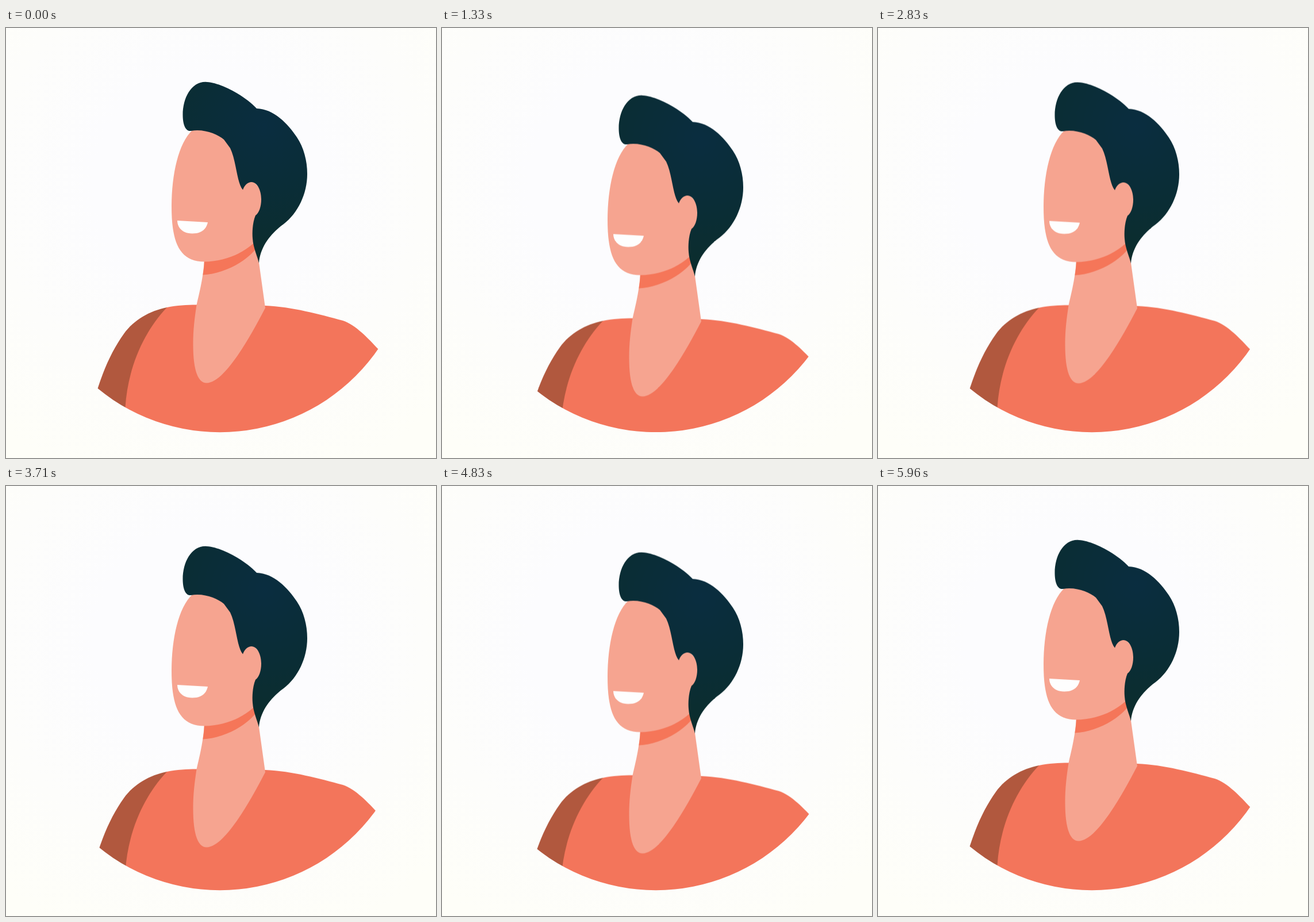
These frames come from a looping animation (748 by 748 pixels, 6000 ms). An HTML page:

```html
<!DOCTYPE html>
<html lang="en">
<head>
<meta charset="utf-8">
<title>Breathing portrait</title>
<style>
  html, body { margin: 0; width: 100%; height: 100%; overflow: hidden; background: #fcfcfd; }
  svg { display: block; width: 100%; height: 100%; }
  .figure { animation: breathe 1.5s ease-in-out infinite alternate; }
  @keyframes breathe {
    from { transform: translateY(0); }
    to { transform: translateY(24px); }
  }
  .skin { fill: #f6a490; }
  .shirt { fill: #f3755b; }
  .sleeve { fill: #b1583e; }
  .shade { fill: #f57659; }
  .teeth { fill: #fefefe; }
</style>
</head>
<body>
<svg viewBox="0 0 748 748">
  <defs>
    <radialGradient id="paper" gradientUnits="userSpaceOnUse" cx="350" cy="270" r="560">
      <stop offset=".35" stop-color="#fcfcfe"/>
      <stop offset="1" stop-color="#fefef8"/>
    </radialGradient>
    <radialGradient id="hair" gradientUnits="userSpaceOnUse" cx="450" cy="170" r="230">
      <stop offset="0" stop-color="#0a2d40"/>
      <stop offset=".5" stop-color="#0a2d37"/>
      <stop offset="1" stop-color="#0c2d2d"/>
    </radialGradient>
    <clipPath id="disc"><circle cx="372" cy="369" r="334.2"/></clipPath>
  </defs>

  <rect width="748" height="748" fill="url(#paper)"/>

  <g clip-path="url(#disc)">
    <g class="figure">
      <path class="sleeve" d="M150 660L159.5 627C172 588 187 557 205 532C222 508 250 492 280 486L300 520L240 760H150Z"/>
      <path class="shirt" d="M280 486C297 482.5 315 481.5 331 481.5L451 483C498 485 545 498 586 509C608 516 631 541 647.5 558.5L680 595V760H204L207.5 660C212 590 240 528 280 486Z"/>

      <!-- neck and neckline -->
      <path class="skin" d="M345 400C344 432 336 462 331.5 482C328 505 325.5 525 325.5 550C325.5 590 332 617.5 349 617.5C378 617.5 420 547 451 487L440 408L432 365Z"/>
      <path class="shade" d="M345 400C345 412 344 420 342.5 429.5C377 428 415 408 433 386L434 365Z"/>

      <!-- face -->
      <path class="skin" d="M324 178C300 200 288 255 288 310C288 370 300 406.5 345 406.5C380 405.5 410 393 430 375L440 365L452 290L415 250L395 170L340 165Z"/>
      <path class="teeth" d="M298 335L351 338C348 352 338 357.5 324 357.5C308 357.5 298 348 298 335Z"/>

      <!-- hair, cut out around the ear -->
      <path fill="url(#hair)" d="M347 93.8C322 93.8 307.5 122 307.5 151C307.5 165 311 180.5 322 179C345 175 368 185 379 194L390 209C401 232 401 268 412 281.5C415 273 421 268 427 268C437 268 444 282 444 298C444 311 440 322 434 326C429 338 428 355 429 366C430 382 437 396 440 409C442 380 462 356 483 341C508 322 524 288 524 254C524 231 518 208 506 190C490 166 466 141 436 140C412 115 370 94 347 93.8Z"/>
    </g>
  </g>
</svg>
</body>
</html>
```
